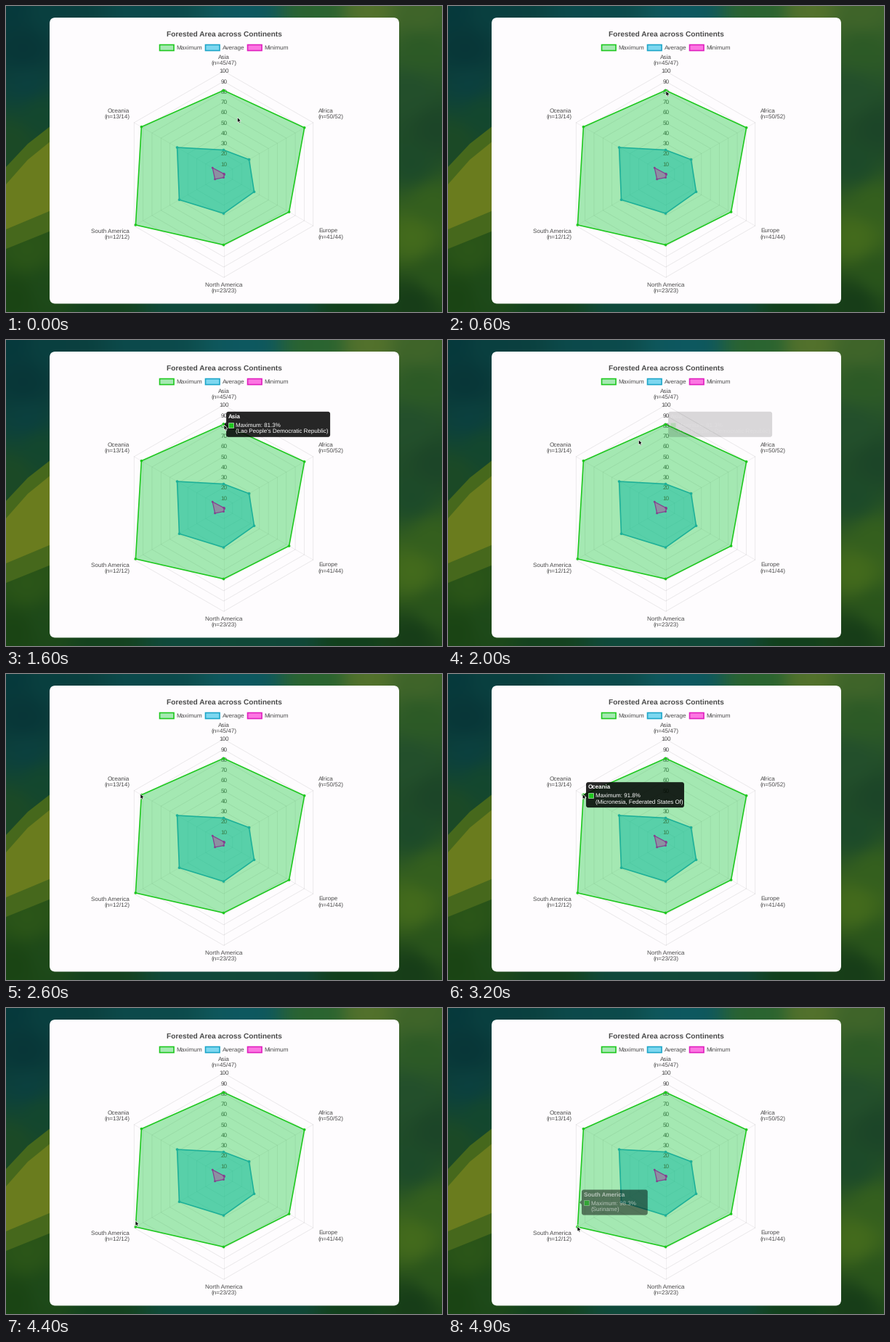
Write a matplotlib script that moves like this. It is 600 by 422 pixels and loops after 5 s.

```python
import numpy as np
import matplotlib.pyplot as plt
from matplotlib.animation import FuncAnimation
from matplotlib.colors import to_rgb
from matplotlib.patches import Circle, FancyBboxPatch, Polygon, Rectangle

W, H, DPI = 600, 422, 64
FRAMES, INTERVAL = 50, 100
CENTER, RADIUS = np.array([299.5, 232]), 142.3
GREEN, BLUE, PINK = "#1ec81e", "#1ca5c8", "#e01ebe"
GREY = "#4a4a4a"

plt.rcParams["font.family"] = "Liberation Sans"
plt.rcParams["text.hinting"] = "none"
fig = plt.figure(figsize=(W / DPI, H / DPI), dpi=DPI)
ax = fig.add_axes([0, 0, 1, 1])


def label(x, y, text, size=8.1, color=GREY, ha="left", **kw):
    return ax.text(x, y, text, fontsize=size * 72 / DPI, color=color,
                   ha=ha, va="baseline", **kw)


def px(width):
    return width * 72 / DPI


def spoke(k, value):
    """Point on axis k (clockwise from the top) at a value of 0 to 100."""
    a = np.radians(60 * k)
    return CENTER + RADIUS * value / 100 * np.array([np.sin(a), -np.cos(a)])


def ring(values):
    return np.array([spoke(k, v) for k, v in enumerate(values)])


def rounded(x, y, w, h, r, **kw):
    box = FancyBboxPatch((x, y), w, h,
                         boxstyle=f"round,pad=0,rounding_size={r}", **kw)
    return ax.add_patch(box)


# Soft forest backdrop blended from a few tones, with a sunlit slope
TONES = [
    (0, 0, "#06393c"), (60, 10, "#0a4040"), (25, 60, "#083638"),
    (30, 110, "#0b4040"), (45, 145, "#14482e"), (8, 185, "#1c4a26"),
    (30, 340, "#2c5618"), (15, 400, "#1a4414"), (55, 390, "#1e4a1a"),
    (200, 6, "#0b4a4c"), (330, 6, "#0d5860"), (430, 8, "#2a6430"),
    (500, 6, "#54722c"), (570, 10, "#40652a"), (570, 60, "#2c5a26"),
    (555, 120, "#234f2c"), (590, 170, "#1c4528"), (560, 220, "#1c4a2a"),
    (585, 270, "#35601e"), (560, 320, "#456c1c"), (590, 370, "#2a551c"),
    (560, 410, "#163c18"), (130, 416, "#14421f"), (250, 416, "#0f4a3c"),
    (380, 416, "#10483a"), (480, 416, "#12401c"),
]


def backdrop():
    yy, xx = np.mgrid[0:H, 0:W] + 0.5
    total, weights = np.zeros((H, W, 3)), np.zeros((H, W, 1))
    for x, y, tone in TONES:
        w = (((xx - x) ** 2 + (yy - y) ** 2 + 400) ** -1.6)[..., None]
        total += w * np.array(to_rgb(tone))
        weights += w
    return total / weights


ax.imshow(backdrop(), extent=(0, W, H, 0), aspect="auto", zorder=0)
for tone, slope in [
        ("#46681c", [(0, 222), (30, 190), (62, 165), (62, 310), (0, 335)]),
        ("#6a7c1e", [(0, 246), (30, 212), (62, 186), (62, 282), (0, 308)])]:
    ax.add_patch(Polygon(slope, fc=tone, ec="none", zorder=0.5))
ax.set_xlim(0, W)
ax.set_ylim(H, 0)
ax.axis("off")
rounded(60, 16, 481, 394.5, 8, fc="#fefcfe", ec="none", zorder=1)

# Title and legend
label(300, 41.7, "Forested Area across Continents", 10.15,
      ha="center", weight="bold")
for x, name, edge, fill in [(211.5, "Maximum", GREEN, "#a5e9b2"),
                            (274.5, "Average", BLUE, "#7dd7f0"),
                            (332.5, "Minimum", PINK, "#fc76e2")]:
    ax.add_patch(Rectangle((x, 53.5), 19.5, 8, fc=fill, ec=edge, lw=px(1.6),
                           snap=False, zorder=2))
    label(x + 23, 60.2, name, 8.2)

# Radar grid and labels
for level in range(10, 101, 10):
    ax.add_patch(Polygon(ring([level] * 6), fill=False, ec="black",
                         alpha=0.1, lw=px(0.7), zorder=2))
    label(300, spoke(0, level)[1] + 2.7, str(level), ha="center", zorder=4)
for k in range(1, 6):
    ax.plot(*np.transpose([CENTER, spoke(k, 100)]), color="black",
            alpha=0.07, lw=px(0.7), zorder=2)

CONTINENTS = [("Asia", "45/47", 300, 73, "center"),
              ("Africa", "50/52", 430, 147.3, "left"),
              ("Europe", "41/44", 430, 312.8, "left"),
              ("North America", "23/23", 300, 387, "center"),
              ("South America", "12/12", 170, 312.8, "right"),
              ("Oceania", "13/14", 170, 147.3, "right")]
for name, count, x, y, ha in CONTINENTS:
    label(x, y, name, ha=ha)
    label(x, y + 8.3, f"(n={count})", ha=ha)

# Data series
MAXIMUM = [81.3, 90.2, 73.1, 68.5, 98.3, 91.8]
AVERAGE = [23.5, 28.4, 34.1, 38, 49.5, 51.9]
MINIMUM = [0.5, 0.6, 0.8, 3.2, 9.7, 12.4]


def series(values, edge, fill, alpha, z, width=1.6, dot=1.8):
    pts = ring(values)
    ax.add_patch(Polygon(pts, fc=fill, ec="none", alpha=alpha, zorder=z))
    ax.add_patch(Polygon(pts, fill=False, ec=edge, lw=px(width), zorder=z))
    for p in pts:
        ax.add_patch(Circle(p, dot, fc=edge, ec="none", zorder=z))


series(AVERAGE, "#1ca0d2", "#00b0e2", 0.5, 3)
series(MAXIMUM, GREEN, "#1fca41", 0.4, 5)
series(MINIMUM, "#85408f", "#9a80a0", 0.8, 6, 1.2, 1.4)

# Tooltip: axis, country, width, shown from, hidden from
TIPS = [(0, "Lao People's Democratic Republic", 143, 0.65, 1.834),
        (5, "Micronesia, Federated States Of", 135, 2.65, 3.65),
        (4, "Suriname", 76, 4.783, 9)]
TIP_H, FADE, SLIDE = 35, 0.2, 0.4

box = rounded(0, 0, 100, TIP_H, 3, fc="black", ec="none", zorder=10)
caret = ax.add_patch(Polygon([(0, 0)] * 3, fc="black", ec="none", zorder=10))
swatch = ax.add_patch(Rectangle((0, 0), 7, 7, fc=GREEN, ec="#d8f5d8",
                                lw=px(0.6), zorder=11))
tip_title = label(0, 0, "", 8, "white", weight="bold", zorder=11)
tip_value = label(0, 0, "", 8, "white", zorder=11)
tip_country = label(0, 0, "", 8, "white", zorder=11)
tip_parts = [swatch, tip_title, tip_value, tip_country]
hover = ax.add_patch(Circle((0, 0), 2.5, fc=GREEN, ec="white", lw=px(0.5),
                            zorder=9))

# Pointer: time, x, y
PATH = np.array([(0, 318.5, 153.5), (0.3, 308, 132), (0.6, 300, 117),
                 (1.75, 300, 117), (2.0, 262.3, 137.5), (2.4, 202, 160),
                 (2.6, 185, 165.2), (3.62, 185.3, 165.6),
                 (3.8, 180, 234.2), (4.1, 178.3, 277),
                 (4.45, 178, 296), (4.75, 178, 301), (5, 178, 301)])
ARROW = np.array([(0, 0), (0, 7.2), (1.6, 5.8), (2.7, 8.3),
                  (3.9, 7.8), (2.8, 5.3), (5, 5.1)])
pointer = ax.add_patch(Polygon(ARROW, fc="black", ec="white", lw=px(0.6),
                               zorder=20))


def tip_bounds(tip):
    x, y = spoke(tip[0], MAXIMUM[tip[0]])
    return np.array([x + 3.6, y - TIP_H / 2, tip[2]])


def draw_tip(t):
    started = [tip for tip in TIPS if t >= tip[3]]
    opacity = 0
    if started:
        tip = started[-1]
        previous = started[-2] if len(started) > 1 else tip
        k, country, _, shown, hidden = tip
        opacity = np.clip(min((t - shown) / FADE, 1 - (t - hidden) / FADE),
                          0, 1)
        ease = 1 - (1 - min((t - shown) / SLIDE, 1)) ** 4
        x, y, w = (1 - ease) * tip_bounds(previous) + ease * tip_bounds(tip)
        box.set_bounds(x, y, w, TIP_H)
        mid = y + TIP_H / 2
        caret.set_xy([(x, mid - 3), (x - 3, mid), (x, mid + 3)])
        swatch.set_xy((x + 3.3, y + 14.8))
        tip_title.set_position((x + 3, y + 9.2))
        tip_value.set_position((x + 13, y + 21))
        tip_country.set_position((x + 13, y + 30))
        tip_title.set_text(CONTINENTS[k][0])
        tip_value.set_text(f"Maximum: {MAXIMUM[k]}%")
        tip_country.set_text(f"({country})")
        hover.center = spoke(k, MAXIMUM[k])
        hover.set_visible(t < hidden)
    else:
        hover.set_visible(False)
    for part in tip_parts:
        part.set_alpha(opacity)
    for part in (box, caret):
        part.set_alpha(0.85 * opacity)


def update(i):
    t = i * INTERVAL / 1000
    tip = [np.interp(t, PATH[:, 0], PATH[:, c]) for c in (1, 2)]
    pointer.set_xy(ARROW + tip)
    draw_tip(t)
    return [pointer, box, caret, hover, *tip_parts]


anim = FuncAnimation(fig, update, frames=FRAMES, interval=INTERVAL,
                     repeat=True, repeat_delay=0, blit=False)
plt.show()
```
